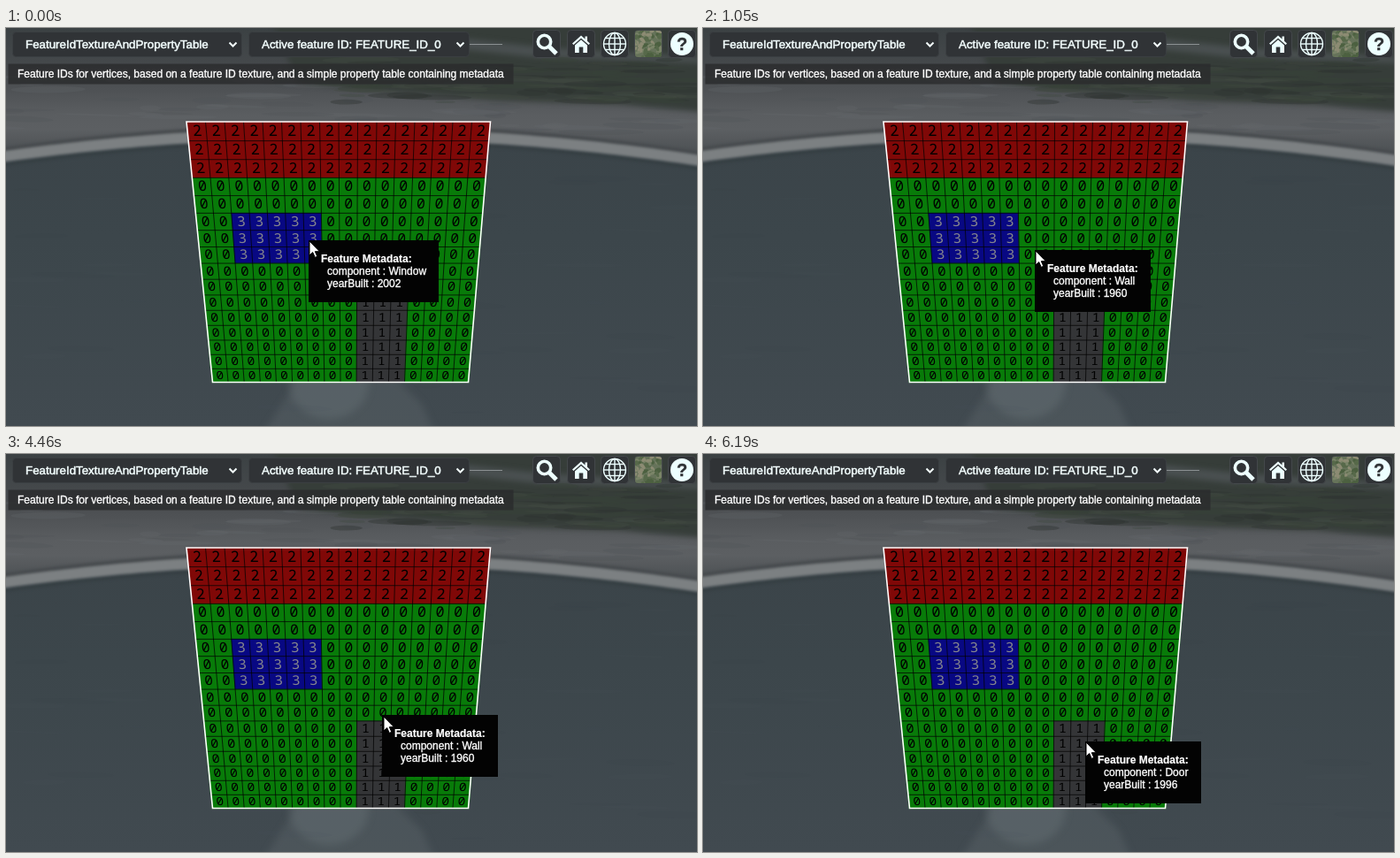
An HTML page with a canvas for the animation above (6540 ms loop, 781 by 450 pixels).

```html
<!DOCTYPE html>
<html lang="en">
<head>
<meta charset="utf-8">
<title>Feature metadata picking</title>
<style>
html, body { margin: 0; width: 100%; height: 100%; overflow: hidden; background: #3d474c; }
canvas { display: block; width: 781px; height: 450px; }
</style>
</head>
<body>
<canvas id="stage" width="781" height="450"></canvas>
<script>
const W = 781, H = 450, LOOP = 6540, N = 16;
const SANS = '"Liberation Sans", Arial, sans-serif';
const MONO = '"Noto Sans Mono", "DejaVu Sans Mono", monospace';
const ctx = document.getElementById('stage').getContext('2d');
const scene = document.createElement('canvas');
scene.width = W;
scene.height = H;
const g = scene.getContext('2d');

// start time, tooltip x, tooltip y, feature, cursor offset
const steps = [
  [0, 342, 240, 'Window', 1],
  [350, 346, 240, 'Window', 1],
  [700, 366, 246, 'Wall', 1],
  [1050, 375, 251, 'Wall', 1],
  [1370, 382, 256, 'Wall', 1],
  [1720, 385, 257, 'Wall', 1],
  [4110, 395, 264, 'Wall', 6],
  [4460, 425, 295, 'Wall', 2],
  [4810, 428, 304, 'Door', 1],
  [5160, 432, 327, 'Door', 1],
  [5840, 432, 326, 'Door', 1],
  [6190, 432, 325, 'Door', 1]
];
const built = { Window: 2002, Wall: 1960, Door: 1996 };

let seed = 7;
function rand() {
  seed = (seed * 16807) % 2147483647;
  return seed / 2147483647;
}

function path(c, pts, close = true) {
  c.beginPath();
  pts.forEach(([x, y], i) => i ? c.lineTo(x, y) : c.moveTo(x, y));
  if (close) c.closePath();
}

// A thin outline gives the labels their slightly heavy weight.
function text(c, str, x, y, size, color = '#fff', weight = 'normal', outline = 0.35) {
  c.font = `${weight} ${size}px ${SANS}`;
  c.fillStyle = c.strokeStyle = color;
  c.lineWidth = outline;
  c.fillText(str, x, y);
  c.strokeText(str, x, y);
}

function panel(x, y, w, h, r, fill, border) {
  g.beginPath();
  g.roundRect(x + 0.5, y + 0.5, w - 1, h - 1, r);
  g.fillStyle = fill;
  g.fill();
  if (border) {
    g.strokeStyle = border;
    g.lineWidth = 1;
    g.stroke();
  }
}

function gradient(y0, y1, stops) {
  const f = g.createLinearGradient(0, y0, 0, y1);
  stops.forEach(([p, c]) => f.addColorStop(p, c));
  return f;
}

function blob(pts, color) {
  path(g, pts);
  g.fillStyle = color;
  g.fill();
}

function streaks(count, x0, x1, y0, y1, colors, alpha) {
  g.globalAlpha = alpha;
  for (let i = 0; i < count; i++) {
    g.fillStyle = colors[i % colors.length];
    g.beginPath();
    g.ellipse(x0 + rand() * (x1 - x0), y0 + rand() * (y1 - y0),
      10 + rand() * 40, 1 + rand() * 3, 0.06 * (rand() - 0.3), 0, 7);
    g.fill();
  }
  g.globalAlpha = 1;
}

const ringY = x => 119 + 26 * ((x - 375) / 375) ** 2;

function arc(offset) {
  const pts = [];
  for (let x = -10; x <= W + 10; x += 10) pts.push([x, ringY(x) + offset]);
  return pts;
}

function drawGround() {
  g.fillStyle = gradient(0, 135, [[0, '#3b4143'], [0.4, '#484b4e'], [0.72, '#5a5d60'], [0.85, '#5c5f62'], [1, '#505457']]);
  g.fillRect(0, 0, W, H);
  streaks(60, 0, W, 55, 118, ['#65686b', '#4c5053'], 0.25);

  g.save();
  g.filter = 'blur(3px)';
  blob([[300, -10], [800, -10], [800, 96], [690, 86], [560, 82], [430, 72], [330, 62]], '#363d39');
  blob([[515, 12], [610, 22], [800, 34], [800, 40], [600, 33], [515, 24]], '#4a5051');
  g.restore();
  streaks(90, 380, W, 36, 84, ['#2d3430', '#424a43', '#394139'], 0.4);
  g.fillStyle = '#8b9092';
  g.fillRect(524, 18, 37, 1);

  path(g, [...arc(0), [W + 10, H], [-10, H]]);
  g.fillStyle = gradient(120, H, [[0, '#3b4449'], [0.35, '#3c464b'], [1, '#414a50']]);
  g.fill();
  g.save();
  g.filter = 'blur(1.5px)';
  g.lineJoin = 'round';
  for (const [dy, width, color] of [[-8, 5, '#474b4e'], [9, 4, '#363f43'], [0, 12, '#7c8082']]) {
    path(g, arc(dy), false);
    g.strokeStyle = color;
    g.lineWidth = width;
    g.stroke();
  }
  g.filter = 'blur(4px)';
  blob([[330, 396], [440, 396], [470, 425], [485, 460], [290, 460], [312, 425]], 'rgba(112,120,124,.24)');
  g.beginPath();
  g.ellipse(365, 402, 45, 40, 0, 0, 7);
  g.fillStyle = 'rgba(120,128,132,.28)';
  g.fill();
  g.restore();
  streaks(50, 0, W, 160, 440, ['#465157', '#364045'], 0.1);
}

// Perspective mapping of unit coordinates onto the wall.
function project(u, v) {
  const k = 344 / 290;
  const t = v * k / (1 + (k - 1) * v);
  return [204 + 29 * t + u * (344 - 54 * t), 106 + 295 * t];
}

function featureAt(col, row) {
  if (row < 3) return 2;
  if (row >= 5 && row < 8 && col >= 2 && col < 7) return 3;
  if (row >= 10 && col >= 9 && col < 12) return 1;
  return 0;
}

function drawWall() {
  const fills = ['#087b09', '#343537', '#800807', '#080883'];
  const at = (c, r) => project(c / N, r / N);
  g.textAlign = 'center';
  g.font = `16px ${MONO}`;
  for (let r = 0; r < N; r++) {
    for (let c = 0; c < N; c++) {
      const id = featureAt(c, r);
      const a = at(c, r), b = at(c + 1, r), d = at(c + 1, r + 1), e = at(c, r + 1);
      path(g, [a, b, d, e]);
      g.fillStyle = g.strokeStyle = fills[id];
      g.lineWidth = 0.5;
      g.fill();
      g.stroke();
      const m = at(c + 0.52, r + 0.46);
      const slant = (e[0] + d[0] - a[0] - b[0]) / 40;
      g.save();
      g.transform((b[0] - a[0]) / 20, 0, slant, (e[1] - a[1]) / 20, m[0], m[1]);
      g.fillStyle = id === 3 ? '#85858c' : '#000';
      g.fillText(id, 0, 5.7);
      g.restore();
    }
  }
  g.textAlign = 'left';
  g.strokeStyle = 'rgba(0,0,0,.72)';
  g.lineWidth = 1;
  for (let i = 1; i < N; i++) {
    path(g, [at(i, 0), at(i, N)], false);
    g.stroke();
    path(g, [at(0, i), at(N, i)], false);
    g.stroke();
  }
  path(g, [[204, 106], [547.5, 106], [522.5, 400.5], [233.5, 400.5]]);
  g.strokeStyle = '#fff';
  g.lineWidth = 1.6;
  g.stroke();
}

function drawSelect(x, w, label, tx) {
  panel(x, 4, w, 29, 4, '#303336', '#3b3f42');
  text(g, label, tx, 23, 13.333, '#f4ffff', 'normal', 0.5);
  g.strokeStyle = '#f4ffff';
  g.lineWidth = 2;
  path(g, [[x + w - 14.5, 16.5], [x + w - 10.5, 20.5], [x + w - 6.5, 16.5]], false);
  g.stroke();
}

function drawIcons() {
  const ink = '#edffff';
  for (const x of [595, 634, 672, 710, 748]) panel(x, 2, 32, 32, 4, '#303336', '#44484b');
  g.strokeStyle = g.fillStyle = ink;

  g.lineWidth = 3.6;
  g.beginPath();
  g.arc(608.5, 15.5, 7.2, 0, 7);
  g.stroke();
  g.lineWidth = 5;
  path(g, [[614, 21], [622, 29]], false);
  g.stroke();

  blob([[640, 17.5], [650, 8.5], [654.5, 12.5], [654.5, 9.5], [657, 9.5], [657, 14.8], [660, 17.5], [658.5, 19], [650, 11.5], [641.5, 19]], ink);
  blob([[643, 19.5], [650, 13.3], [657, 19.5], [657, 28], [652.3, 28], [652.3, 21.5], [647.7, 21.5], [647.7, 28], [643, 28]], ink);

  g.lineWidth = 1.4;
  for (const rx of [12.5, 6.5]) {
    g.beginPath();
    g.ellipse(688, 18, rx, 12.5, 0, 0, 7);
    g.stroke();
  }
  path(g, [[688, 5.5], [688, 30.5]], false);
  g.stroke();
  for (const [y, half] of [[11.5, 10.5], [18, 12.5], [24.5, 10.5]]) {
    path(g, [[688 - half, y], [688 + half, y]], false);
    g.stroke();
  }

  // Small aerial view
  g.save();
  g.beginPath();
  g.roundRect(711, 3, 30, 30, 3);
  g.clip();
  g.fillStyle = '#66735a';
  g.fillRect(711, 3, 30, 30);
  const tones = ['#4c6040', '#8c8b73', '#7a8468', '#57694a'];
  for (let i = 0; i < 60; i++) {
    g.fillStyle = tones[i % 4];
    g.beginPath();
    g.ellipse(711 + rand() * 30, 3 + rand() * 30, 1 + rand() * 4, 1 + rand() * 2, rand() * 3, 0, 7);
    g.fill();
  }
  g.restore();

  g.fillStyle = ink;
  g.beginPath();
  g.arc(764, 18, 13, 0, 7);
  g.fill();
  g.textAlign = 'center';
  text(g, '?', 764, 25, 20, '#303336', 'bold');
  g.textAlign = 'left';
}

function drawScene() {
  drawGround();
  drawWall();
  drawSelect(7, 260, 'FeatureIdTextureAndPropertyTable', 22);
  drawSelect(274, 250, 'Active feature ID: FEATURE_ID_0', 289);
  panel(2, 40, 572, 24, 0, 'rgba(42,43,44,.82)');
  text(g, 'Feature IDs for vertices, based on a feature ID texture, and a simple property table containing metadata', 13, 56, 12);
  drawIcons();
}

function drawCursor(x, y) {
  path(ctx, [[0, 0], [0, 16], [3.7, 12.6], [6.3, 18.4], [8.8, 17.3], [6.3, 11.7], [11.4, 11.7]].map(([a, b]) => [x + a, y + b]));
  ctx.fillStyle = '#fff';
  ctx.strokeStyle = '#000';
  ctx.lineWidth = 1;
  ctx.fill();
  ctx.stroke();
}

function render(now) {
  const t = now % LOOP;
  const [, x, y, kind, lag] = steps.filter(s => s[0] <= t).pop();
  ctx.drawImage(scene, 0, 0);
  ctx.fillStyle = '#030303';
  ctx.fillRect(x, y, kind === 'Window' ? 147 : 131, 70);
  text(ctx, 'Feature Metadata:', x + 14, y + 25, 12, '#fff', 'bold', 0.2);
  text(ctx, 'component : ' + kind, x + 21, y + 39, 12);
  text(ctx, 'yearBuilt : ' + built[kind], x + 21, y + 53, 12);
  drawCursor(x + lag, y + lag);
}

drawScene();
const start = performance.now();
function tick() {
  render(performance.now() - start);
  requestAnimationFrame(tick);
}
tick();
</script>
</body>
</html>
```
